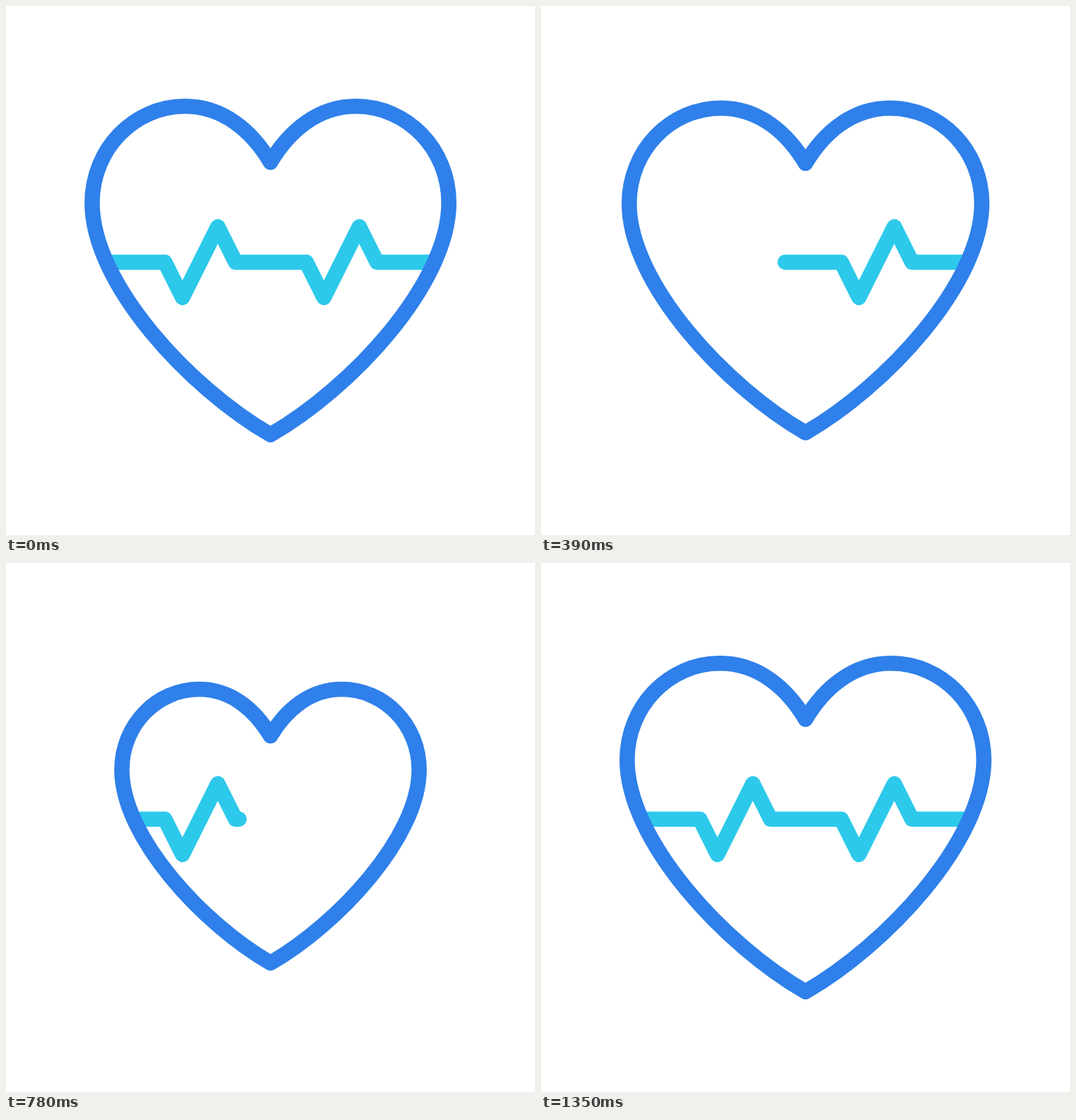
An HTML page with a canvas that plays this animation: 748 by 748 pixels, repeating every 1.71 s.

```html
<!DOCTYPE html>
<html lang="en">
<head>
<meta charset="utf-8">
<title>Heartbeat</title>
<style>
  html, body { margin: 0; width: 100%; height: 100%; overflow: hidden; background: #fff; }
  canvas { display: block; }
</style>
</head>
<body>
<canvas width="748" height="748"></canvas>
<script>
const ctx = document.querySelector('canvas').getContext('2d');
const LOOP = 1710, STEP = 30;
const SMALL = 0.662;
const CENTER_X = 374, CENTER_Y = 362.4;
const TIP = 243.8;
const ARC = 0.553; // handle length of a quarter ellipse

// Key measures of half a heart at rest, and how a full squash changes them.
const REST = { notch: -141.5, notchLean: 26, topX: 121, topY: -220.6, sideX: 252.2, sideY: -84, tipLean: 113 };
const SQUASH = { notch: 31, notchLean: -15, topX: 14, topY: 24.4, sideX: 38, sideY: 27, tipLean: -68 };

const spike = 'l25 50 50-100 25 50';
const pulse = new Path2D(`M100 362.2h124.5${spike}h100${spike}h150`);

const lerp = (a, b, u) => a + (b - a) * u;
const easeInOut = u => u < 0.5 ? 2 * u * u : 1 - 2 * (1 - u) ** 2;
const easeOutSine = u => Math.sin(u * Math.PI / 2);

// Two beats of 420 ms; the second one recovers slowly.
const beatTime = t => t < 420 ? t : t - 420;

function heartScale(t) {
  const beat = beatTime(t);
  if (beat < 240) return lerp(1, SMALL, easeInOut(beat / 240));
  if (t < 420) return lerp(SMALL, 1, easeOutSine((t - 240) / 180));
  return lerp(1, SMALL, Math.max(0, (1350 - t) / 690) ** 3.7);
}

function heartSquash(t) {
  const beat = beatTime(t);
  return beat < 60 ? beat / 60 : Math.max(0, (240 - beat) / 180);
}

function heartPath(scale, squash) {
  const m = {};
  for (const key in REST) m[key] = REST[key] + SQUASH[key] * squash;
  const path = new Path2D();

  for (const side of [-1, 1]) {
    const at = (x, y) => [CENTER_X + side * x * scale, CENTER_Y + y * scale];
    const curve = (a, b, end) => path.bezierCurveTo(...a, ...b, ...end);
    path.moveTo(...at(0, m.notch));
    curve(at(m.notchLean, lerp(m.notch, m.topY, ARC)),
          at(m.topX * (1 - 0.45), m.topY),
          at(m.topX, m.topY));
    curve(at(lerp(m.topX, m.sideX, ARC), m.topY),
          at(m.sideX, lerp(m.sideY, m.topY, ARC)),
          at(m.sideX, m.sideY));
    curve(at(m.sideX, m.sideY + 115),
          at(m.tipLean, TIP - 65),
          at(0, TIP));
  }
  return path;
}

function strokePulse(dash, offset) {
  ctx.setLineDash(dash);
  ctx.lineDashOffset = offset;
  ctx.stroke(pulse);
}

function draw(now) {
  const t = Math.floor(now % LOOP / STEP) * STEP;
  const heart = heartPath(heartScale(t), heartSquash(t));
  const tail = 18.7 + 0.898 * t;
  const head = 483.5 + 1.45 * (t - 870);

  ctx.fillStyle = '#fff';
  ctx.fillRect(0, 0, 748, 748);
  ctx.lineWidth = 21.6;
  ctx.lineCap = ctx.lineJoin = 'round';

  ctx.save();
  ctx.clip(heart);
  ctx.strokeStyle = '#2dc9eb';
  if (tail < 820) strokePulse([2000, 2000], -tail);
  if (head > 0) strokePulse([head, 2000], 0);
  ctx.restore();

  ctx.strokeStyle = '#2f80ea';
  ctx.stroke(heart);
  requestAnimationFrame(draw);
}
requestAnimationFrame(draw);
</script>
</body>
</html>
```
